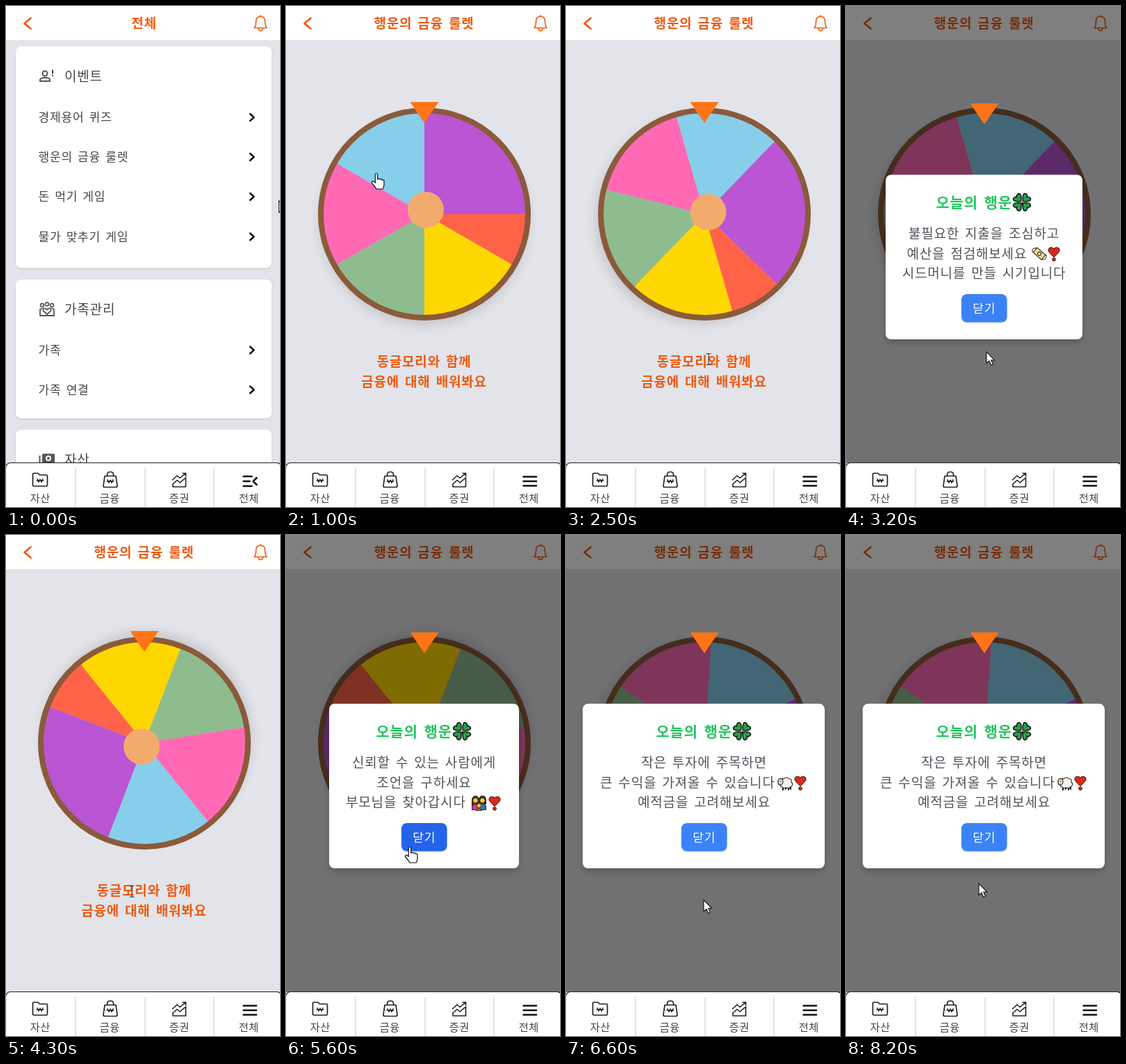
Animation of 394x720 px, one loop 8.3 s. Source, as an HTML page:

```html
<!DOCTYPE html>
<html lang="ko">
<head>
<meta charset="utf-8">
<style>
html, body { margin: 0; width: 100%; height: 100%; overflow: hidden; background: #e3e4e9; }
svg { display: block; }
text { font-family: "Noto Sans CJK KR", "Noto Sans CJK", "Noto Sans KR", sans-serif; letter-spacing: .043em; word-spacing: .1em; white-space: pre; }
.line { fill: none; stroke-linecap: round; stroke-linejoin: round; }
</style>
</head>
<body>
<svg id="stage" width="394" height="720" viewBox="0 0 394 720">
  <defs>
    <filter id="soft" x="-20%" y="-20%" width="140%" height="140%"><feGaussianBlur stdDeviation="8"/></filter>
    <filter id="lift" x="-10%" y="-10%" width="120%" height="125%"><feDropShadow dx="0" dy="1" stdDeviation="1.2" flood-opacity=".16"/></filter>
    <filter id="float" x="-10%" y="-10%" width="120%" height="125%"><feDropShadow dx="0" dy="5" stdDeviation="5" flood-opacity=".2"/></filter>
    <g id="heart"><path d="M0 7C-5 3-9 0-9-4C-9-9-2-9 0-5C2-9 9-9 9-4C9 0 5 3 0 7Z"/></g>
    <g id="clover" stroke="#111" stroke-width="2" fill="#2a9d48">
      <path d="M0 0Q2 8 5 12" fill="none"/>
      <g id="leaves"></g>
    </g>
    <g id="bang" stroke="#3a0808" stroke-width="1">
      <path d="M0 5C-4 1-8-2-8-5C-8-10-2-10 0-7C2-10 8-10 8-5C8-2 4 1 0 5Z" fill="#d92a1c"/>
      <circle cy="8.3" r="2.3" fill="#d92a1c"/>
    </g>
    <g id="cash" stroke="#222" stroke-width="1">
      <path d="M-10 -3Q-11-9-4-8L1-4L-5 1Z" fill="#fff"/>
      <path d="M4 8Q11 10 10 2L5-1L1 4Z" fill="#fff"/>
      <g transform="rotate(42)"><rect x="-8" y="-4.500" width="16" height="9" fill="#f0e08a"/><circle r="2.500" fill="#fff6c8"/></g>
    </g>
    <g id="family" stroke="#222" stroke-width="1">
      <path d="M-10 10V-3Q-10-10-5-10Q0-10 0-3V3Z" fill="#5b3420"/>
      <path d="M0 0V-4Q0-10 5-10Q10-10 10-4V2Z" fill="#3c2a20"/>
      <circle cx="-5" cy="-3.5" r="3.8" fill="#ffc83d"/><circle cx="5" cy="-3.5" r="3.8" fill="#ffc83d"/>
      <path d="M-10 10V4Q-5-1 0 4V10Z" fill="#d83b7d"/><path d="M0 10V4Q5-1 10 4V10Z" fill="#2b78c9"/>
      <circle cy="4" r="3.2" fill="#ffc83d"/><path d="M-4 11Q0 4 4 11Z" fill="#e8622c"/>
    </g>
    <g id="sheep" stroke="#222" stroke-width="1.1">
      <path d="M-3 5V10M5 5V10M1 5V9M8 4V9" stroke-width="2"/>
      <path d="M-5 5Q-9 2-6-3Q-6-8-1-7Q2-10 5-7Q10-7 9-2Q13 2 8 5Q5 8 2 6Q-2 8-5 5Z" fill="#f7f4ec"/>
      <path d="M-10-1Q-11-6-7-7Q-3-7-3-3Q-3 2-7 2Q-10 2-10-1Z" fill="#f0dcc6"/><circle cx="-7" cy="-3" r=".8" fill="#222" stroke="none"/>
    </g>
  </defs>
  <rect width="394" height="720" fill="#e3e4e9"/>
  <g id="menu"></g>
  <g id="game">
    <g id="wheel"></g>
    <g id="slogan"></g>
  </g>
  <g id="header"></g>
  <rect id="shade" width="394" height="657" fill="#000" opacity=".5"/>
  <path id="marker" d="M178.500 138H219.500L199 168Z" fill="#ff7417"/>
  <g id="modals"></g>
  <g id="nav"></g>
  <g id="cursor">
    <path data-kind="arrow" d="M0 0V16.500L3.900 13L6.700 19.200L9.400 18L6.700 12H11.700Z" fill="#fff" stroke="#111" stroke-width="1.1"/>
    <path data-kind="hand" d="M-1.700 1.500Q0-1 1.700 1.500V9Q4 7 5.200 9.300Q7.500 8 8.500 10.200Q11 9.500 11 12V17Q11 20 9 23H0Q-3 18-6.500 14.500Q-7 11.500-4 12L-1.700 14Z" fill="#fff" stroke="#111" stroke-width="1.2"/>
    <path data-kind="beam" class="line" d="M-3-8H-1L0-7L1-8H3M0-7V7M-3 8H-1L0 7L1 8H3" stroke="#333" stroke-width="1.1"/>
  </g>
</svg>
<script>
const LOOP = 8300, STEP = 100, PAGE_AT = 800;
const INK = '#474747', ORANGE = '#ee5a10';
const $ = id => document.getElementById(id);

// y is the middle of the glyphs
const label = (x, y, str, size, fill = INK, weight = 400, anchor = 'start') =>
  `<text x="${x}" y="${y + size * .36}" font-size="${size * .95}" fill="${fill}" font-weight="${weight}" text-anchor="${anchor}">${str}</text>`;
const line = (d, stroke, w) => `<path class="line" d="${d}" stroke="${stroke}" stroke-width="${w}"/>`;
const use = (id, x, y) => `<use href="#${id}" x="${x}" y="${y}"/>`;
const show = (el, on) => el.setAttribute('display', on ? 'inline' : 'none');

$('leaves').innerHTML = [45, 135, 225, 315].map(a =>
  `<use href="#heart" transform="rotate(${a}) translate(0 -7) scale(.72)"/>`).join('');

// menu page
const card = (y, h) => `<rect x="14" y="${y}" width="368" height="${h}" rx="8" fill="#fff" filter="url(#lift)"/>`;
const row = (y, str) => label(46.5, y, str, 18) + line(`M351 ${y - 5}L356.500 ${y}L351 ${y + 5}`, '#111', 2.4);
const person = `<circle cx="56" cy="97" r="3.500" fill="none" stroke="#555" stroke-width="2"/>` +
  line('M49 108V106Q50 103 56 103Q63 103 63 106V108Z', '#555', 2) + line('M67 92.500V97M67 100V100.200', '#444', 2);
const group = [[52, 430], [59, 428.5], [66, 430]].map(([x, y]) =>
  `<circle cx="${x}" cy="${y}" r="2.400" fill="none" stroke="#555" stroke-width="1.700"/>`).join('') +
  line('M49 436V445H69V436L66 434.500M49 436L52 434.500M59 443L53.500 438Q53 433.500 56.500 434.500L59 436.500L61.500 434.500Q65 433.500 64.500 438Z', '#555', 1.8);
const bill = line('M48.500 647V660H66', '#555', 2) +
  `<rect x="52" y="643.500" width="18" height="13" rx="1" fill="#555"/><circle cx="61" cy="650" r="4" fill="#fff"/><circle cx="61" cy="650" r="2" fill="#555"/>`;
$('menu').innerHTML =
  card(58, 318.5) + person + label(84, 101, '이벤트', 20) +
  row(160, '경제용어 퀴즈') + row(217, '행운의 금융 룰렛') + row(274, '돈 먹기 게임') + row(331.5, '물가 맞추기 게임') +
  card(393, 199.5) + group + label(84, 436, '가족관리', 20) + row(494.5, '가족') + row(551.5, '가족 연결') +
  card(609, 120) + bill + label(84, 652, '자산', 20);

// wheel
const sectors = [[90, '#ba55d3'], [30, '#ff6347'], [60, '#ffd700'], [60, '#8fbc8f'], [60, '#ff69b4'], [60, '#87ceeb']];
const R = 146;
const rim = a => `${R * Math.sin(a * Math.PI / 180)} ${-R * Math.cos(a * Math.PI / 180)}`;
let from = 0, pie = '';
for (const [size, fill] of sectors) {
  pie += `<path d="M0 0L${rim(from)}A${R} ${R} 0 0 1 ${rim(from + size)}Z" fill="${fill}"/>`;
  from += size;
}
$('wheel').innerHTML = `<circle cy="10" r="150" fill="#000" opacity=".13" filter="url(#soft)"/>` + pie +
  `<circle r="149" fill="none" stroke="#8b5a3b" stroke-width="8"/><circle cx="2" cy="-6" r="26" fill="#f3ab6d"/>`;
$('slogan').innerHTML = label(198.5, 511, '동글모리와 함께', 20, ORANGE, 600, 'middle') +
  label(198.5, 540, '금융에 대해 배워봐요', 20, ORANGE, 600, 'middle');

// header
$('header').innerHTML = `<rect width="394" height="49" fill="#fff"/>` +
  line('M35.500 17.500L26.500 25L35.500 32.500', ORANGE, 2.7) +
  `<g id="titles">${label(198.5, 25, '전체', 20, '#fa5a0c', 700, 'middle')}${label(198.5, 25, '행운의 금융 룰렛', 20, ORANGE, 700, 'middle')}</g>` +
  line('M357 31.500Q359.500 29 359.500 22Q359.500 15 366 15Q372.500 15 372.500 22Q372.500 29 375 31.500ZM363 32Q363 35.500 366 35.500Q369 35.500 369 32M366 15V13.500', ORANGE, 1.6);

// bottom bar
const won = (x, y) => line(`M${x - 4} ${y - 2.5}L${x - 2} ${y + 2.5}L${x} ${y - 2}L${x + 2} ${y + 2.5}L${x + 4} ${y - 2.5}M${x - 5} ${y}H${x + 5}`, '#222', 1.3);
$('nav').innerHTML = `<rect x="-.500" y="656.500" width="397" height="80" rx="7" fill="#fff" stroke="#222" stroke-width="1.200"/>` +
  [100, 200, 299].map(x => `<rect x="${x - 1}" y="664" width="2" height="56" fill="#e3e3e5"/>`).join('') +
  line('M38.500 673Q38.500 671.500 40 671.500H46L48.500 674H58Q59.500 674 59.500 675.500V688.500Q59.500 690 58 690H40Q38.500 690 38.500 688.500Z', '#222', 1.7) + won(49, 682) +
  line('M142 675.500H158L160 689.500Q160 691.500 158 691.500H142Q140 691.500 140 689.500ZM145.500 675V673Q146 669.500 150 669.500Q154 669.500 154.500 673V675', '#222', 1.7) + won(150, 683) +
  line('M239.500 681L246 675L250 678.500L258.500 671.500M254 671.500H258.500V676M240 691V687L246 681.500L250 685L258.500 678V691Z', '#222', 1.6) +
  `<g id="burgers">${line('M341.500 676H353.500M341.500 683H350.500M341.500 690H353.500M360.500 678L355.500 683L360.500 688', '#111', 2.5)}${line('M341.500 676.500H360M341.500 683H360M341.500 689.500H360', '#111', 2.5)}</g>` +
  ['자산', '금융', '증권', '전체'].map((s, i) => label(49.3 + i * 100, 707, s, 16, '#444', 400, 'middle')).join('');

// fortunes: opening and closing time, left edge, right edge, lines
const mid = (y, s) => label(198.5, y, s, 20, '#50545c', 400, 'middle');
const left = (x, y, s) => label(x, y, s, 20, '#50545c');
const fortunes = [
  [2600, 3700, 57, 340, mid(327, '불필요한 지출을 조심하고') + left(87.5, 355.5, '예산을 점검해보세요') + use('cash', 278, 356) + use('bang', 299, 356) + mid(384, '시드머니를 만들 시기입니다')],
  [4600, 5700, 62, 335, mid(327, '신뢰할 수 있는 사람에게') + mid(355.5, '조언을 구하세요') + left(86, 384, '부모님을 찾아갑시다') + use('family', 277.5, 385) + use('bang', 300, 385)],
  [6500, LOOP, 24, 372, mid(327, '작은 투자에 주목하면') + left(49, 355.5, '큰 수익을 가져올 수 있습니다') + use('sheep', 315, 357) + use('bang', 337, 356) + mid(384, '예적금을 고려해보세요')]
];
$('modals').innerHTML = fortunes.map(([, , x0, x1, body]) =>
  `<g><rect x="${x0}" y="242.500" width="${x1 - x0}" height="236.500" rx="8" fill="#fff" filter="url(#float)"/>` +
  label(129.5, 282, '오늘의 행운', 22, '#22c55e', 700) + use('clover', 253, 282) + body +
  `<rect class="btn" x="166" y="414" width="65.500" height="40.500" rx="8" filter="url(#lift)"/>` +
  label(198.7, 435, '닫기', 18, '#fff', 500, 'middle') + '</g>').join('');
const panels = [...$('modals').children];

// spins: start, duration, first angle, last angle
const spins = [[1600, 820, 0, 1124], [3800, 500, 1124, 2001], [5800, 500, 2001, 2944]];
const angleAt = t => {
  let angle = 0;
  for (const [start, dur, a, b] of spins) {
    if (t < start) break;
    const p = Math.min(1, (t - start) / dur);
    angle = a + (b - a) * (1 - (1 - p) ** 3);
  }
  return angle;
};

const moves = [
  [0, 392.5, 280, 'arrow'], [400, 160, 222, 'hand'], [600, 112, 217, 'hand'], [800, 112, 217, 'arrow'],
  [1000, 130, 240, 'hand'], [1500, 198, 340, 'hand'], [1700, 200, 420, 'arrow'], [1900, 205, 510, 'beam'],
  [2600, 205, 507, 'arrow'], [3200, 202, 497, 'arrow'], [3500, 198, 440, 'hand'], [3800, 192, 410, 'hand'],
  [4000, 186, 455, 'arrow'], [4200, 181, 513, 'beam'], [4600, 181, 510, 'arrow'], [5200, 178, 449, 'hand'],
  [5600, 178, 448, 'hand'], [5800, 182, 410, 'hand'], [6000, 190, 455, 'arrow'], [6200, 196, 515, 'beam'],
  [6500, 198, 524, 'arrow'], [6600, 198, 524.5, 'arrow'], [7300, 191, 501, 'arrow'], [LOOP, 191, 501, 'arrow']
];
const cursorAt = t => {
  const i = moves.findIndex((m, k) => k + 1 === moves.length - 1 || t < moves[k + 1][0]);
  const [t0, x0, y0, kind] = moves[i], [t1, x1, y1] = moves[i + 1];
  const p = (t - t0) / (t1 - t0);
  return [x0 + (x1 - x0) * p, y0 + (y1 - y0) * p, kind];
};

function draw(t) {
  const inGame = t >= PAGE_AT;
  show($('menu'), !inGame);
  show($('game'), inGame);
  for (const id of ['titles', 'burgers']) [...$(id).children].forEach((el, i) => show(el, inGame === (i === 1)));

  $('wheel').setAttribute('transform', `translate(199 299) rotate(${angleAt(t)})`);
  const open = fortunes.findIndex(([a, b]) => t >= a && t < b);
  const [x, y, kind] = cursorAt(t);
  const hover = kind === 'hand';
  show($('shade'), open >= 0);
  show($('slogan'), open < 0);
  show($('marker'), inGame);
  $('marker').setAttribute('transform', `translate(0 ${open >= 0 ? 2 : 0})`);
  panels.forEach((el, i) => {
    show(el, i === open);
    el.querySelector('.btn').setAttribute('fill', hover ? '#2563eb' : '#3b82f6');
  });
  $('cursor').setAttribute('transform', `translate(${x} ${y})`);
  for (const el of $('cursor').children) show(el, el.dataset.kind === kind);
}

const begin = performance.now();
function tick(now) {
  const t = Math.max(0, now - begin) % LOOP;
  draw(Math.floor(t / STEP) * STEP);
  requestAnimationFrame(tick);
}
draw(0);
requestAnimationFrame(tick);
</script>
</body>
</html>
```
